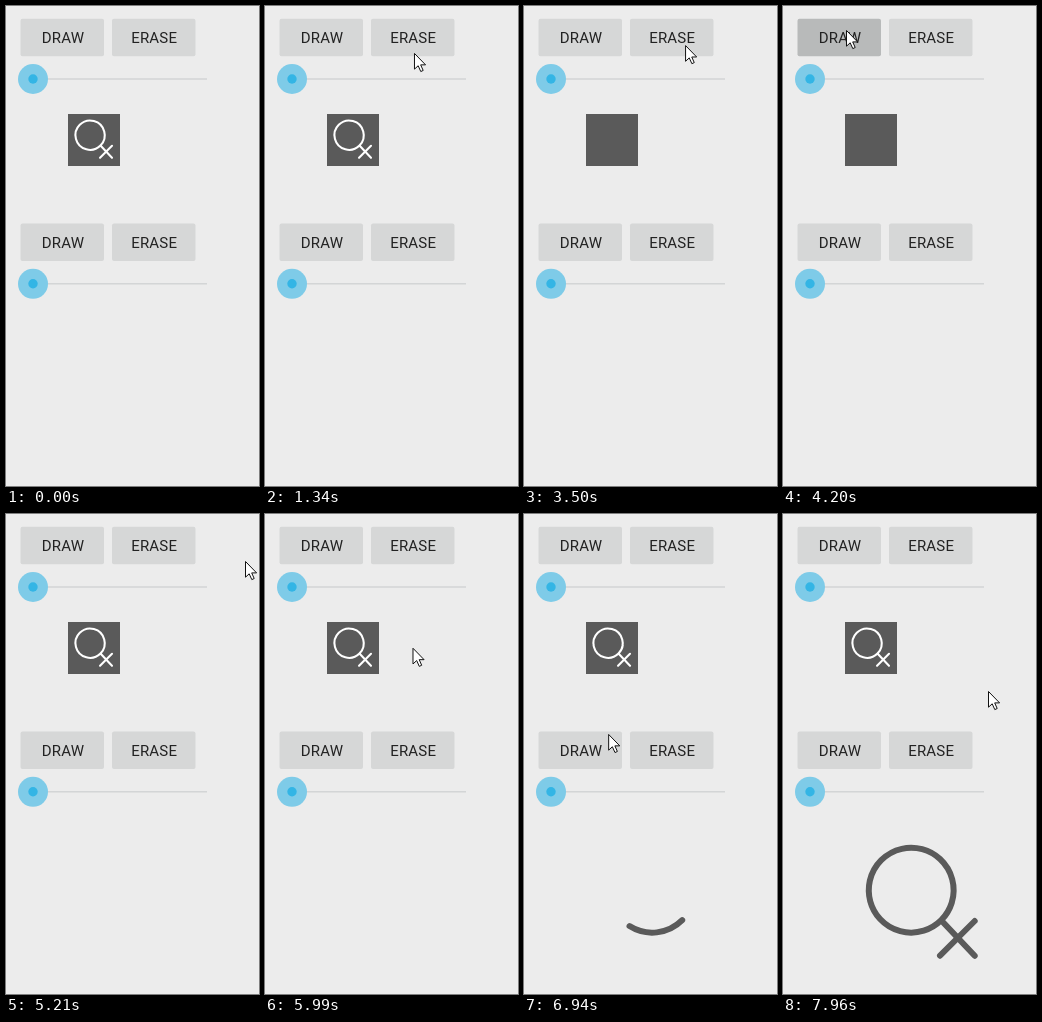
An HTML page that plays this animation: 253 by 480 pixels, repeating every 8000 ms.

```html
<!DOCTYPE html>
<html lang="en">
<head>
<meta charset="utf-8">
<title>Path drawing demo</title>
<style>
  html, body { margin: 0; width: 100%; height: 100%; overflow: hidden; background: #ececec; }
  svg { display: block; width: 253px; height: 480px; }
  text { font: 15px Roboto, sans-serif; letter-spacing: .2px; fill: #222; text-anchor: middle; }
  .button { fill: #d6d7d7; }
  .icon { fill: none; stroke-width: 6; stroke-linecap: round; }
</style>
</head>
<body>
<svg viewBox="0 0 253 480">
  <defs>
    <g id="controls">
      <rect class="button" x="106" y="12.7" width="83.5" height="37.6" rx="2"/>
      <text x="57" y="37.4">DRAW</text>
      <text x="148.2" y="37.4">ERASE</text>
      <path d="M27 73H201" stroke="#d3d5d6" stroke-width="1.6"/>
      <circle cx="27" cy="73" r="15" fill="#7ecbe8"/>
      <circle cx="27" cy="73" r="4.7" fill="#33b5e5"/>
    </g>
  </defs>
  <rect width="253" height="480" fill="#ececec"/>
  <rect id="topDraw" class="button" x="14.5" y="12.7" width="83.5" height="37.6" rx="2"/>
  <use href="#controls"/>
  <rect id="lowDraw" class="button" x="14.5" y="217.5" width="83.5" height="37.6" rx="2"/>
  <use href="#controls" y="204.8"/>
  <rect x="62" y="108" width="52" height="52" fill="#5a5a5a"/>
  <g id="topIcon" class="icon" stroke="#fff" transform="translate(84.1 129.2) scale(.345)"></g>
  <g id="lowIcon" class="icon" stroke="#5a5a5a" transform="translate(128.2 376.2)"></g>
  <path id="cursor" d="M.5 .5V16.2L4.2 12.8L6.8 18.6L9.2 17.5L6.7 11.9H11.6Z"
        fill="#fff" stroke="#111" stroke-width="1"/>
</svg>
<script>
const LOOP = 8000;
const $ = id => document.getElementById(id);
const clamp = v => Math.min(1, Math.max(0, v));
const ease = v => .5 - .5 * Math.cos(Math.PI * clamp(v));
const progress = (t, start, span) => ease((t - start) / span);

// Strokes are drawn one after the other: the lens with its handle, then the second diagonal.
const STROKES = ['M30 30A42.43 42.43 0 1 1 30.01 29.99L63.5 65.5', 'M63.5 30.8L28.8 65.5'];

function makeIcon(id) {
  const parts = STROKES.map(d => {
    const path = document.createElementNS('http://www.w3.org/2000/svg', 'path');
    path.setAttribute('d', d);
    $(id).append(path);
    return { path, length: path.getTotalLength() };
  });
  const total = parts.reduce((sum, part) => sum + part.length, 0);
  return amount => {
    let left = amount * total;
    for (const { path, length } of parts) {
      const shown = Math.min(length, Math.max(0, left));
      path.style.visibility = shown > .3 ? 'visible' : 'hidden';
      path.style.strokeDasharray = shown < length ? `${shown} ${length + 10}` : 'none';
      left -= length;
    }
  };
}

// Pointer journeys: start, end, from, to, easing
const linear = v => v;
const MOVES = [
  [840, 1340, [189, 121], [149, 47], linear],
  [1340, 1520, [149, 47], [145, 37], linear],
  [1880, 2420, [145, 37], [232, 50], ease],
  [3160, 3920, [232, 50], [63, 24], ease],
  [4340, 4800, [63, 24], [239, 47], ease],
  [5580, 6430, [239, 47], [46, 230], ease],
  [6430, 6520, [46, 230], [43, 231], Math.floor],
  [6820, 7200, [43, 231], [222, 183], ease],
  [7870, 7960, [228, 168], [205, 177], Math.floor]
];

function moveCursor(t) {
  const hidden = t < 840 || (t >= 7230 && t < 7870);
  $('cursor').style.visibility = hidden ? 'hidden' : 'visible';
  if (hidden) return;
  const [start, end, from, to, curve] = MOVES.findLast(move => t >= move[0]);
  const k = curve(clamp((t - start) / (end - start)));
  const [x, y] = from.map((v, i) => v + (to[i] - v) * k);
  $('cursor').setAttribute('transform', `translate(${x} ${y})`);
}

function press(id, t, start) {
  const k = t < start ? 0 : 1 - clamp((t - start - 90) / 80);
  const mix = (a, b) => Math.round(a + (b - a) * k);
  $(id).style.fill = `rgb(${mix(214, 184)},${mix(215, 186)},${mix(215, 186)})`;
}

const drawTop = makeIcon('topIcon');
const drawLow = makeIcon('lowIcon');
const origin = performance.now();

function render() {
  const t = Math.max(0, performance.now() - origin) % LOOP;
  drawTop(1 - progress(t, 2200, 680) + progress(t, 4430, 700));
  drawLow(progress(t, 6840, 390));
  press('topDraw', t, 4195);
  press('lowDraw', t, 6760);
  moveCursor(t);
  requestAnimationFrame(render);
}
render();
</script>
</body>
</html>
```
